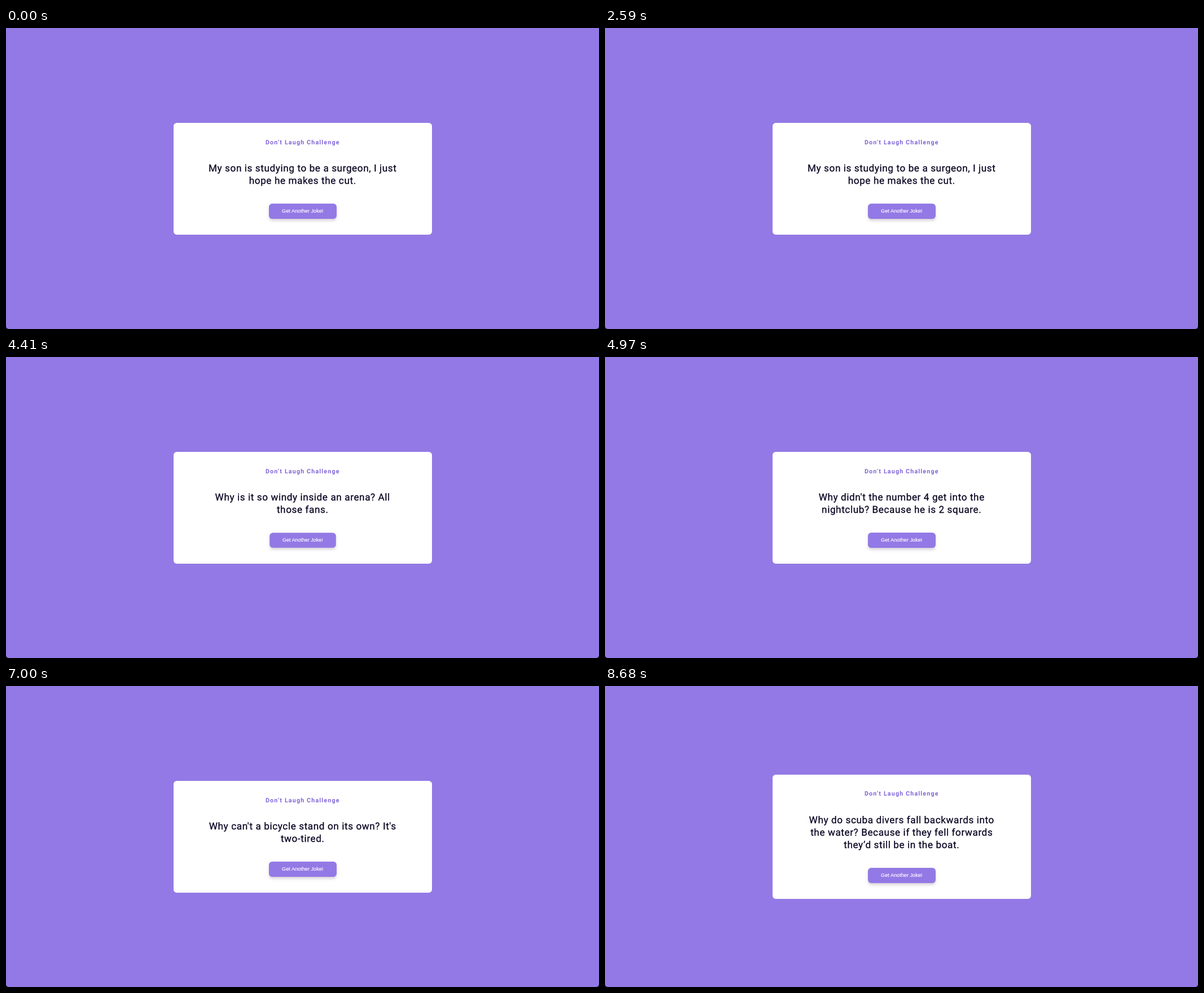
Write an HTML page that moves like this. It is 1051 px wide and 533 px high and loops after 9.1 s.

```html
<!DOCTYPE html>
<html lang="en">
<head>
<meta charset="utf-8">
<title>Don’t Laugh Challenge</title>
<style>
  :root { --purple: #9379e5; }
  * { box-sizing: border-box; }
  html, body {
    margin: 0;
    width: 100%;
    height: 100%;
    overflow: hidden;
    background: #120c1e;
  }
  .stage {
    display: flex;
    align-items: center;
    justify-content: center;
    width: 1051px;
    height: 533px;
    background: var(--purple);
    border-radius: 0 0 5px 5px;
    font-family: Roboto, sans-serif;
    text-rendering: geometricPrecision;
  }
  .card {
    position: relative;
    left: .25px;
    top: .4px;
    width: 458px;
    padding: 28.6px 11.4px;
    background: #fff;
    border-radius: 5.7px;
    text-align: center;
  }
  h3 {
    position: relative;
    top: .3px;
    margin: 0;
    color: #8064d8;
    font-size: 10.72px;
    font-weight: 700;
    line-height: 12.6px;
    letter-spacing: 1.145px;
  }
  .joke {
    position: relative;
    top: .6px;
    margin: 28.6px auto;
    color: #05001f;
    font-size: 17.18px;
    line-height: 22.3px;
    letter-spacing: .58px;
    white-space: pre;
    -webkit-text-stroke: .25px;
  }
  .btn {
    display: block;
    width: max-content;
    height: 26.9px;
    margin: 0 auto;
    padding: 0 23.2px;
    border: 0;
    border-radius: 5.7px;
    background: var(--purple);
    box-shadow: 0 2.9px 8.6px rgba(0, 0, 0, .08), 0 3.4px 3.4px rgba(70, 0, 70, .1);
    color: #fff;
    font: 9.16px/26.9px "Liberation Sans", Arial, sans-serif;
    -webkit-text-stroke: .15px;
  }
  .btn.pressed { transform: scale(.98); }
</style>
</head>
<body>
<main class="stage">
  <section class="card">
    <h3>Don’t Laugh Challenge</h3>
    <div class="joke">My son is studying to be a surgeon, I just
hope he makes the cut.</div>
    <button class="btn" type="button">Get Another Joke!</button>
  </section>
</main>
<script>
  const LOOP = 9100;
  const PRESS = 140;
  const clicks = [1190, 2660, 4340, 5670, 7490];
  const jokes = [
    [0, "My son is studying to be a surgeon, I just\nhope he makes the cut."],
    [3290, "Why is it so windy inside an arena? All\nthose fans."],
    [4900, "Why didn't the number 4 get into the\nnightclub? Because he is 2 square."],
    [6230, "Why can't a bicycle stand on its own? It's\ntwo-tired."],
    [8260, "Why do scuba divers fall backwards into\nthe water? Because if they fell forwards\nthey’d still be in the boat."]
  ];
  const joke = document.querySelector(".joke");
  const btn = document.querySelector(".btn");
  const start = performance.now();

  function draw() {
    const t = (performance.now() - start) % LOOP;
    const text = jokes.filter(([from]) => from <= t).pop()[1];
    if (joke.textContent !== text) joke.textContent = text;
    btn.classList.toggle("pressed", clicks.some(c => t >= c && t < c + PRESS));
    requestAnimationFrame(draw);
  }
  draw();
</script>
</body>
</html>
```
